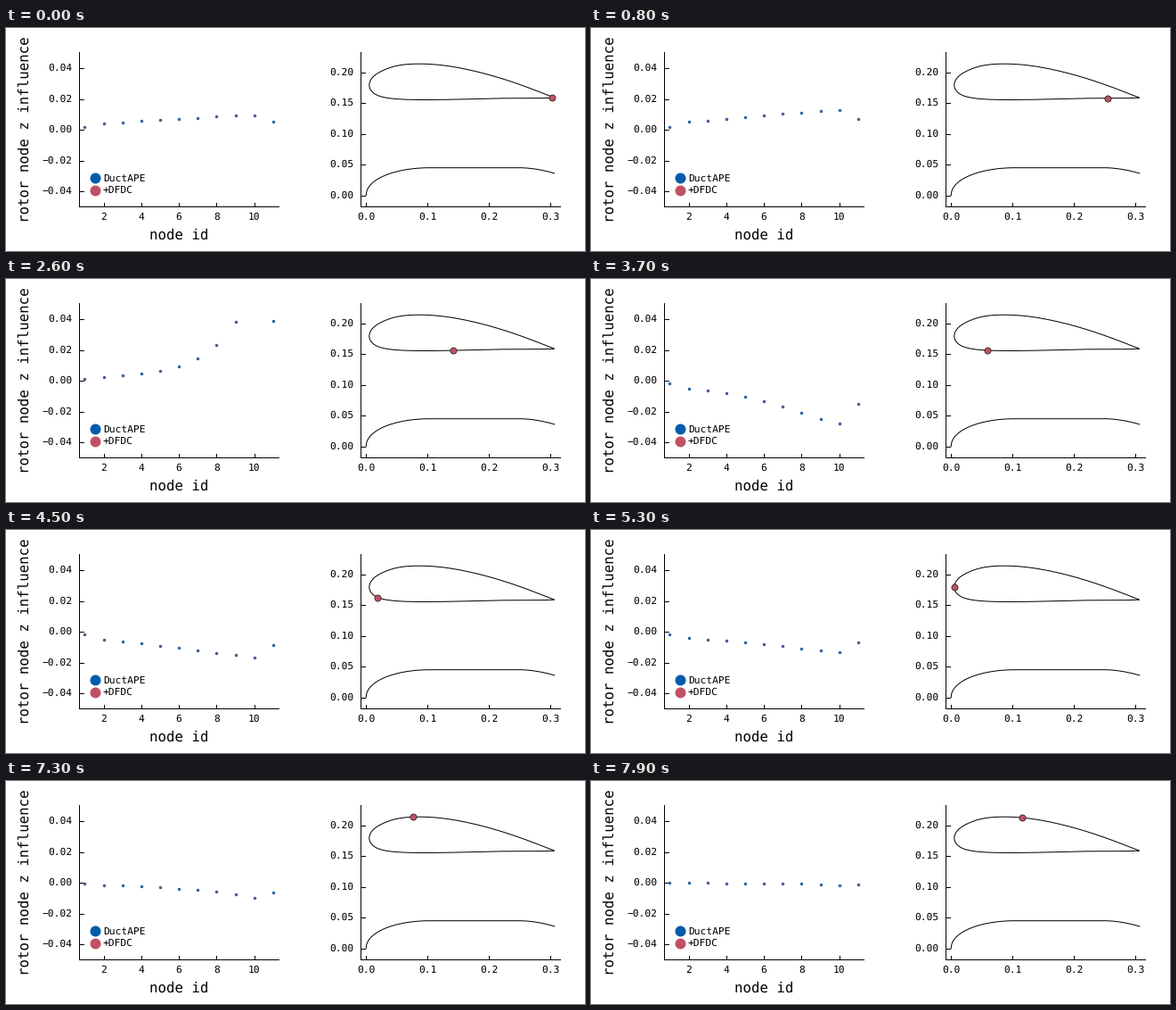
Animation of 650 by 250 pixels, one loop 8 s. Source, as a matplotlib script:

```python
import numpy as np
import matplotlib
import matplotlib.pyplot as plt
from matplotlib.animation import FuncAnimation
from matplotlib.patches import Rectangle

W, H, DPI = 650, 250, 100
FRAMES, STEP = 80, 100
PX = 72 / DPI
BLUE, RED = "#005cab", "#c15064"

matplotlib.rcParams["font.family"] = "DejaVu Sans Mono"
matplotlib.rcParams["text.hinting"] = "none"

# Stage pixels: left plot and right plot scales
NODE_X0, NODE_DX = 67.2, 21.15
INF_Y0, INF_DY = 114.0, 1725.0
GEO_X0, GEO_Y0, GEO_D = 404.3, 187.7, 690.0

# Duct outline, parametrised by the step at which the probe gets there
DUCT = np.array([
    (-0.5, 615.1, 78.2), (0, 613.0, 78.3), (9, 576.0, 78.6),
    (18, 537.1, 79.3), (27, 497.5, 80.2), (36, 450.2, 80.2),
    (45, 417.1, 75.5), (49, 410.3, 70.6), (53, 407.8, 64.3),
    (58, 411.4, 55.5), (63, 422.1, 48.1), (66, 431.5, 44.3),
    (72, 453.1, 40.5), (79, 483.5, 41.1), (86, 514.0, 45.7),
    (93, 544.5, 53.1), (100, 574.5, 62.6), (110, 615.1, 78.0),
])

# Rotor plane
ROTOR_Z = 0.1195
NODES = np.arange(1, 12)
ROTOR_R = np.linspace(0.047, 0.1565, NODES.size)


def spline(t, knots, vals):
    """Natural cubic spline through (knots, vals), evaluated at t."""
    h = np.diff(knots)
    n = len(knots)
    a, b = np.eye(n), np.zeros_like(vals)
    slope = np.diff(vals, axis=0) / h[:, None]
    for i in range(1, n - 1):
        a[i, i - 1:i + 2] = h[i - 1], 2 * (h[i - 1] + h[i]), h[i]
        b[i] = 6 * (slope[i] - slope[i - 1])
    m = np.linalg.solve(a, b)
    t = np.atleast_1d(t).astype(float)
    k = np.clip(np.searchsorted(knots, t) - 1, 0, n - 2)
    d = h[k][:, None]
    u = (t - knots[k])[:, None]
    v = d - u
    return ((m[k] * v**3 + m[k + 1] * u**3) / (6 * d)
            + (vals[k] / d - m[k] * d / 6) * v
            + (vals[k + 1] / d - m[k + 1] * d / 6) * u)


def duct(t):
    return spline(t, DUCT[:, 0], DUCT[:, 1:])


def ellip_e(m):
    """Complete elliptic integral of the second kind."""
    th = (np.arange(200) + 0.5) * np.pi / 400
    return np.sqrt(1 - np.outer(m, np.sin(th) ** 2)).mean(axis=1) * np.pi / 2


def influence(z, r):
    """Axial velocity at (z, r) from the rotor's source rings."""
    dz = z - ROTOR_Z
    s2 = dz**2 + (r + ROTOR_R) ** 2
    d2 = dz**2 + (r - ROTOR_R) ** 2
    e = ellip_e(4 * r * ROTOR_R / s2)
    weight = np.full(NODES.size, ROTOR_R[1] - ROTOR_R[0])
    weight[[0, -1]] /= 2
    return weight * ROTOR_R * dz * e / (np.pi * np.sqrt(s2) * d2)


fig = plt.figure(figsize=(W / DPI, H / DPI), dpi=DPI, facecolor="white")
ax = fig.add_axes([0, 0, 1, 1])
ax.set(xlim=(0, W), ylim=(H, 0))
ax.axis("off")


def line(x, y, width=1.0, **kw):
    ax.plot(x, y, color="black", lw=width * PX, **kw)


def label(x, y, s, size=8.15, **kw):
    ax.text(x, y, s, fontsize=size, va="center", **kw)


def dots(x, y, size, color, edge=0, **kw):
    return ax.plot(x, y, "o", ms=size * PX, mfc=color, mec="black",
                   mew=edge * PX, snap=False, **kw)[0]


def frame_axes(left, xticks, yticks):
    """Spines with inward ticks; ticks are (pixel, text) pairs."""
    base = 200.3
    line([left, left], [27, base])
    line([left, left + 224], [base, base])
    for x, s in xticks:
        line([x, x], [base, 196])
        label(x, 212, s, ha="center")
    for y, s in yticks:
        line([left, left + 4.5], [y, y])
        label(left - 8.3, y, s, ha="right")


def num(v, digits):
    return f"{v:.{digits}f}".replace("-", "\u2212")


frame_axes(82.3,
           [(NODE_X0 + NODE_DX * n, str(n)) for n in range(2, 11, 2)],
           [(INF_Y0 - INF_DY * v, num(v, 2))
            for v in (-0.04, -0.02, 0.0, 0.02, 0.04)])
frame_axes(398.3,
           [(GEO_X0 + GEO_D * v, num(v, 1)) for v in (0.0, 0.1, 0.2, 0.3)],
           [(GEO_Y0 - GEO_D * v, num(v, 2))
            for v in (0.0, 0.05, 0.1, 0.15, 0.2)])

label(194.2, 232, "node id", 11.3, ha="center")
label(21, 114, "rotor node z influence", 11.3, ha="center", rotation=90)

for y, color, name in ((168.4, BLUE, "DuctAPE"), (181.5, RED, "+DFDC")):
    dots([99.5], [y], 12, color)
    label(108.8, y + 0.7, name)

# Duct and centre body
line(*duct(np.linspace(-0.5, 110, 500)).T)
a = np.linspace(0, np.pi / 2, 80)
tail = np.linspace(0, 1, 30)
line(np.r_[475.5 - 71.2 * np.cos(a), 577 + 38.7 * tail],
     np.r_[GEO_Y0 - 31 * np.sin(a) ** 0.95, GEO_Y0 - 31 + 6.2 * tail**1.8])

clip = Rectangle((82, 27), 225, 174, transform=ax.transData)
node_x = NODE_X0 + NODE_DX * NODES
series = [dots(node_x, 0 * node_x, size, color)
          for size, color in ((3.4, BLUE), (1.7, RED))]
for s in series:
    s.set_clip_path(clip)
probe = dots([], [], 7.2, RED, edge=0.6, zorder=5)


def update(i):
    x, y = duct(i)[0]
    probe.set_data([x], [y])
    vals = influence((x - GEO_X0) / GEO_D, (GEO_Y0 - y) / GEO_D)
    for s in series:
        s.set_ydata(INF_Y0 - INF_DY * vals)
    return [*series, probe]


anim = FuncAnimation(fig, update, frames=FRAMES, interval=STEP,
                     repeat=True, repeat_delay=0, blit=False)
plt.show()
```
